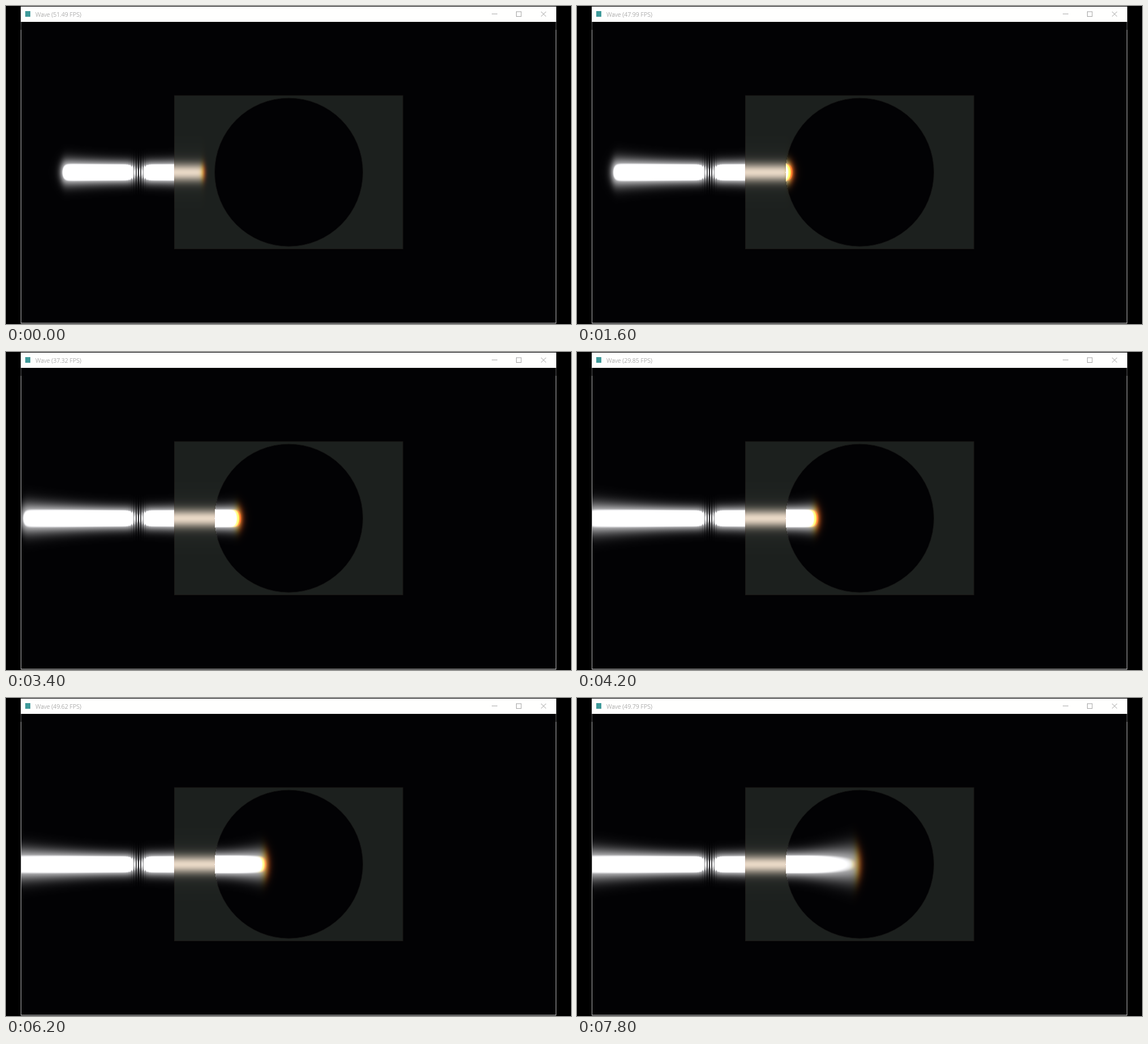
An HTML page with a canvas that plays this animation: 998 by 561 pixels, repeating every 8000 ms.

```html
<!DOCTYPE html>
<html lang="en">
<head>
<meta charset="utf-8">
<title>Wave</title>
<style>
  html, body { margin: 0; width: 100%; height: 100%; overflow: hidden; background: #000; }
  canvas { display: block; }
</style>
</head>
<body>
<canvas id="stage" width="998" height="561"></canvas>
<script>
const ctx = document.getElementById('stage').getContext('2d', { willReadFrequently: true });
const LOOP = 8000, STEP = 200;
const AXIS = 293.5, SOURCE = 234;
const GLASS = { x: 297.5, y: 158, w: 403.5, h: 270.5 };
const HOLE = { x: 499.5, y: 293.2, r: 131 };
const GLASS_INDEX = 1.5;
const AREA = { x: 27, y: 215, w: 500, h: 157 };

// [step, optical position of the leading edge]
const FRONT = [[0, 349], [8, 386.5], [12, 404], [17, 422], [18, 425.5], [24, 441.5],
               [26, 447], [30, 465.5], [31, 470], [36, 495], [39, 508]];
// [step, frame rate shown in the title bar]
const RATES = [[0, '51.49'], [4, '49.13'], [8, '47.99'], [12, '47.80'], [15, '41.27'],
               [17, '37.32'], [19, '29.85'], [22, '27.41'], [26, '26.63'], [28, '44.72'],
               [31, '49.62'], [35, '49.46'], [39, '49.79']];

const gauss = (v, width) => Math.exp(-((v / width) ** 2));
const sigmoid = v => 1 / (1 + Math.exp(-v));

function smoothstep(from, to, v) {
  const t = Math.min(1, Math.max(0, (v - from) / (to - from)));
  return t * t * (3 - 2 * t);
}

// Grey halo that jumps to a saturated white core.
const expose = v => .7 * Math.min(1, v) ** .85 + .3 * smoothstep(.85, 1.15, v);

function interpolate(table, step) {
  const i = table.findIndex(row => row[0] >= step);
  if (i === 0) return table[0][1];
  const [s0, a] = table[i - 1], [s1, b] = table[i];
  return a + (b - a) * (step - s0) / (s1 - s0);
}

function hold(table, step) {
  return table.filter(row => row[0] <= step).pop()[1];
}

function fill(color, x, y, w, h) {
  ctx.fillStyle = color;
  ctx.fillRect(x, y, w, h);
}

function line(...points) {
  ctx.beginPath();
  points.forEach(([x, y], i) => i ? ctx.lineTo(x, y) : ctx.moveTo(x, y));
  ctx.stroke();
}

function drawWindow() {
  fill('#000', 0, 0, 998, 561);
  fill('#020204', 27, 28, 944, 531);
  for (const x of [26, 971]) {
    fill('#5c5c5c', x, 28, 1, 14);
    fill('#b8b8b8', x, 42, 1, 518);
  }
  fill('#d8d8d8', 26, 559, 946, 1);

  fill('#1c201e', GLASS.x, GLASS.y, GLASS.w, GLASS.h);
  ctx.strokeStyle = '#191715';
  ctx.lineWidth = 1;
  ctx.strokeRect(GLASS.x, GLASS.y, GLASS.w, GLASS.h);
  ctx.fillStyle = '#020204';
  ctx.beginPath();
  ctx.arc(HOLE.x, HOLE.y, HOLE.r, 0, Math.PI * 2);
  ctx.fill();
  ctx.strokeStyle = '#151514';
  ctx.stroke();
}

function drawTitleBar(step) {
  fill('#fffffe', 26, 1, 946, 27);
  fill('#3f9a9a', 34, 9, 9, 10);
  ctx.fillStyle = '#808080';
  ctx.font = '300 10.6px "Open Sans", sans-serif';
  ctx.fillText(`Wave (${hold(RATES, step)} FPS)`, 52, 18.5);
  ctx.strokeStyle = '#999';
  ctx.lineWidth = .9;
  line([858, 14], [868, 14]);
  ctx.strokeRect(901.5, 10, 8.5, 8.5);
  line([945, 10], [954, 18.5]);
  line([954, 10], [945, 18.5]);
}

// Static strength, tint and optical position of the beam at one point.
function beamAt(x, dy) {
  const edge = HOLE.x - Math.sqrt(HOLE.r ** 2 - dy ** 2);
  const inGlass = x >= GLASS.x && x < edge;
  let strength;
  if (inGlass) {
    strength = .75 * gauss(dy, 16) + .05 * gauss(dy, 36);
  } else if (x >= edge) {
    const w = 17 * Math.hypot(1, (x - 368) / 85);
    strength = 2.3 * (17 / w) ** 1.5 * gauss(dy, w);
  } else {
    const w = 16 * Math.hypot(1, (x - SOURCE) / 185);
    const dx = x - SOURCE;
    const fringe = .5 + .5 * Math.cos(2 * Math.PI * dx / 4.2);
    strength = 2.2 * 16 / w * gauss(dy, w)
      * (1 - .4 * gauss(dx, 13)) * (1 - gauss(dx, 10) * fringe);
  }
  return {
    strength,
    inGlass,
    tint: inGlass ? [1, .9, .82] : [1, 1, 1],
    path: x < edge ? edge - (edge - x) * GLASS_INDEX : x
  };
}

drawWindow();
const base = ctx.getImageData(AREA.x, AREA.y, AREA.w, AREA.h);
const frame = ctx.createImageData(AREA.w, AREA.h);
const beam = [];
for (let row = 0; row < AREA.h; row++) {
  for (let col = 0; col < AREA.w; col++) {
    beam.push(beamAt(AREA.x + col + .5, AREA.y + row + .5 - AXIS));
  }
}

function drawBeam(step) {
  const front = interpolate(FRONT, step);
  const tail = 91 - (front - 349) * .97;
  const lag = [6.5, 10, 14.5]; // red leads, blue trails
  frame.data.set(base.data);
  beam.forEach(({ strength, inGlass, tint, path }, i) => {
    if (strength < .002) return;
    const x = AREA.x + i % AREA.w + .5;
    const dy = AREA.y + Math.floor(i / AREA.w) + .5 - AXIS;
    const bend = dy * dy * .002;
    const rear = sigmoid((x - tail - 8 - bend) / 3.2);
    for (let c = 0; c < 3; c++) {
      const lead = sigmoid((front - lag[c] - bend - path) / 3);
      const light = strength * tint[c] * rear * lead;
      frame.data[i * 4 + c] += 255 * (inGlass ? light : expose(light));
    }
  });
  ctx.putImageData(frame, AREA.x, AREA.y);
}

let shown = -1;
const start = performance.now();
function tick(now) {
  const step = Math.floor(Math.max(0, now - start) % LOOP / STEP);
  if (step !== shown) {
    shown = step;
    drawTitleBar(step);
    drawBeam(step);
  }
  requestAnimationFrame(tick);
}
tick(start);
</script>
</body>
</html>
```
